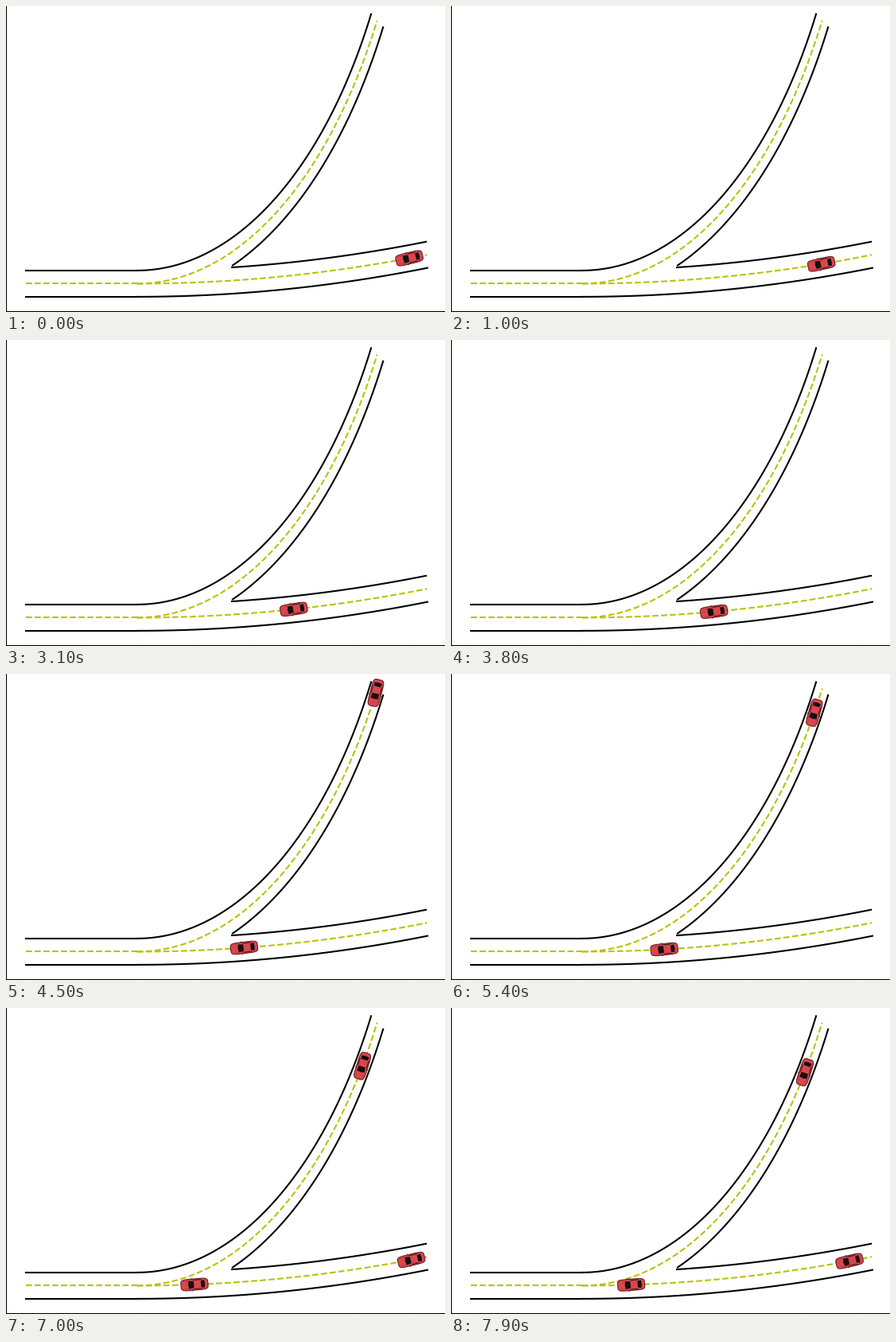
A matplotlib script that plays this animation: 552 by 384 pixels, repeating every 8000 ms.

```python
import numpy as np
import matplotlib.pyplot as plt
from matplotlib.animation import FuncAnimation
from matplotlib.patches import Polygon
from matplotlib.transforms import Affine2D

W, H, DPI = 552, 384, 100
FRAMES, INTERVAL = 80, 100

# Road plan in metres, with pixels per metre along x and y.
SX, SY = 6.97, 13.2
START_X, ROAD_Y = 25.4, 348.4
STRAIGHT, HALF = 20, 1.25
FORK_X = START_X + SX * STRAIGHT
MAIN, RAMP = 500, 50                # turn radii
LENGTH = RAMP * np.pi / 3           # both branches are equally long
SPLIT = 17.15                       # where the inner edges begin
LEAN = -0.05

fig = plt.figure(figsize=(W / DPI, H / DPI), dpi=DPI, facecolor="white")
ax = fig.add_axes([0, 0, 1, 1])
ax.set_xlim(0, W)
ax.set_ylim(H, 0)
ax.axis("off")


def branch(radius, s, offset=0):
    """Pixel position at distance s past the fork, offset to the right."""
    t, r = s / radius, radius + offset
    return FORK_X + SX * r * np.sin(t), ROAD_Y - SY * (radius - r * np.cos(t))


def heading(radius, s):
    t = s / radius
    return np.arctan2(-SY * np.sin(t), SX * np.cos(t))


def line(x, y, offset):
    style = dict(color="black", zorder=2) if offset else \
        dict(color="#bac208", ls="--", zorder=1)
    ax.plot(x, y, lw=1.5, **style)


def draw_axes():
    thin = dict(color="black", lw=0.8)
    ax.plot([0, 0], [0, 383], **thin)
    ax.plot([0, W], [383, 383], **thin)
    for x in START_X + 10 * SX * np.arange(8):
        ax.plot([x, x], [383, H], **thin)


def draw_roads():
    for offset in (-HALF, 0, HALF):
        y = ROAD_Y + SY * offset
        line([START_X, FORK_X], [y, y], offset)
        for radius, inner in ((MAIN, -HALF), (RAMP, HALF)):
            s = np.linspace(SPLIT if offset == inner else 0, LENGTH, 120)
            line(*branch(radius, s, offset), offset)


def rounded(cx, rx, ry, power=0.4):
    a = np.linspace(0, 2 * np.pi, 60)
    c, s = np.cos(a), np.sin(a)
    return np.c_[cx + rx * np.sign(c) * abs(c)**power,
                 ry * np.sign(s) * abs(s)**power]


class Car:
    """Top view of a car; its nose points to local -x."""

    def __init__(self, radius, start, s, speed):
        self.radius, self.start, self.s, self.speed = radius, start, s, speed
        self.parts = []
        for side in (-1, 1):
            self.add([(-5, 6.5 * side), (-3, 8.5 * side), (-1, 6.5 * side)], "#5a1a20")
        self.add(rounded(0, 17, 7.1), "#d8474c", "#6e1c24")
        for side in (-1, 1):
            self.add([(-15, 4.4 * side), (-7, 5.2 * side), (-7, 4.4 * side)], "#a5323a")
            self.add([(-3, 6.2 * side), (10, 6.2 * side), (8, 5.1 * side),
                      (0, 5.1 * side)], "#4a151b")
        self.add([(-7, -5), (-0.8, -4.2), (-0.8, 4.2), (-7, 5), (-8, 0)], "#150f13")
        self.add([(8.2, -4), (12.5, -5), (13.3, 0), (12.5, 5), (8.2, 4)], "#150f13")

    def add(self, pts, color, border="none"):
        part = Polygon(pts, closed=True, fc=color, ec=border, lw=0.8, zorder=5)
        self.parts.append(ax.add_patch(part))

    def place(self, tick):
        s = self.s - self.speed * (tick - self.start)
        x, y = branch(self.radius, s)
        angle = heading(self.radius, s) + LEAN
        pose = Affine2D().rotate(angle).translate(x, y) + ax.transData
        for part in self.parts:
            part.set_visible(tick >= self.start)
            part.set_transform(pose)


def clock(frame):
    """Whole traffic ticks so far: a steady pace that brakes later on."""
    late = max(frame - 35, 0)
    return max(int(0.92 * frame - 0.22 - 0.0094 * late**2), 0)


draw_axes()
draw_roads()
cars = [Car(MAIN, 0, 49.2, 0.747),
        Car(RAMP, 40, 51.9, 0.37),
        Car(MAIN, 50, 50.8, 0.62)]


def update(frame):
    for car in cars:
        car.place(clock(frame))
    return [part for car in cars for part in car.parts]


anim = FuncAnimation(fig, update, frames=FRAMES, interval=INTERVAL,
                     repeat=True, repeat_delay=0)
plt.show()
```
